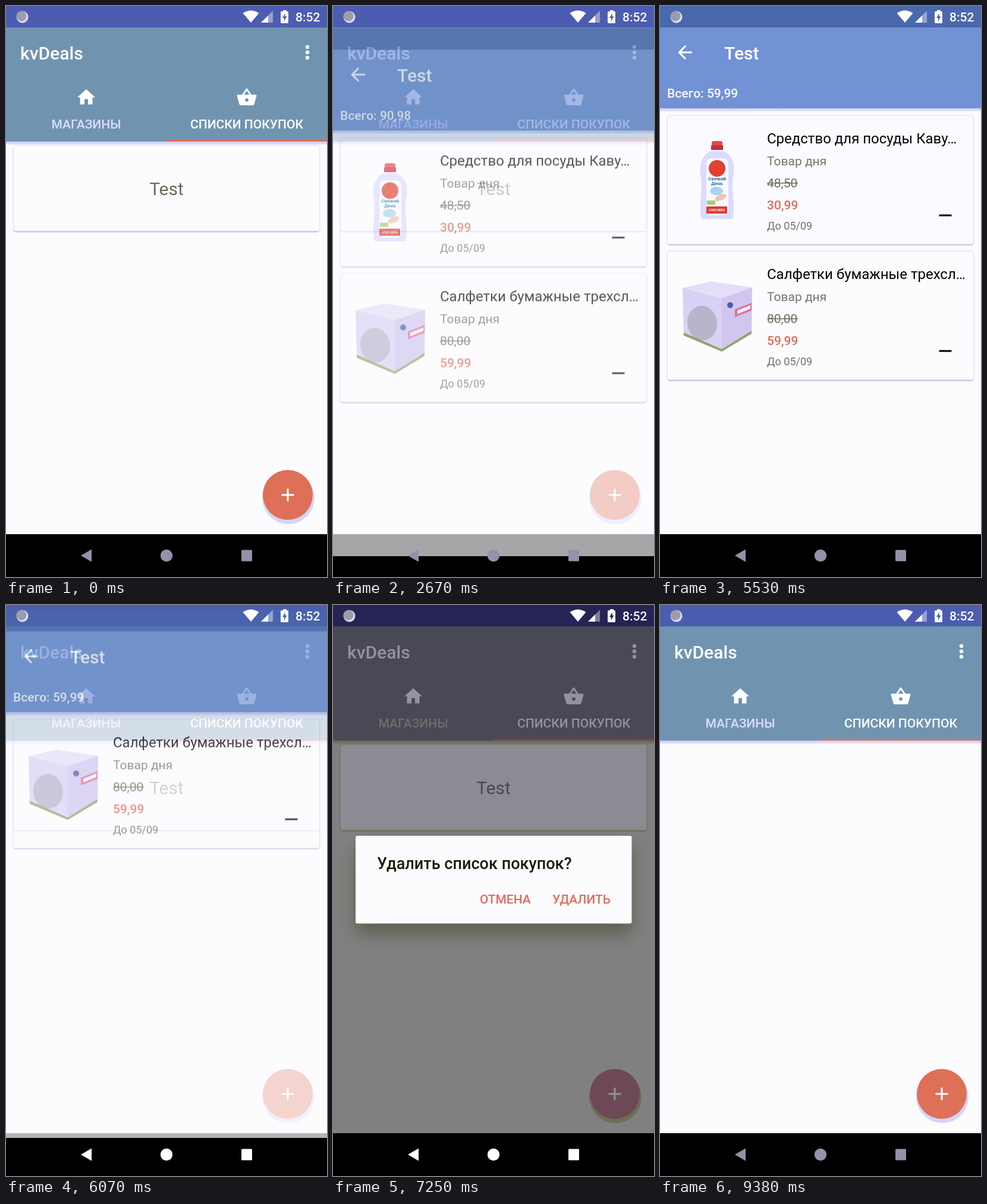
These frames come from a looping animation (540x960 px, 9.96 s). An HTML page with a canvas:

```html
<!DOCTYPE html>
<html lang="ru">
<head>
<meta charset="utf-8">
<title>Shopping lists</title>
<style>
html, body { margin: 0; width: 100%; height: 100%; overflow: hidden; background: #000; }
canvas { display: block; width: 100vw; height: 100vh; }
</style>
</head>
<body>
<canvas id="stage" width="540" height="960"></canvas>
<script>
const W = 540, H = 960, BOTTOM = 888, LOOP = 9960;
const stage = document.getElementById('stage').getContext('2d');
const layer = document.createElement('canvas');
layer.width = W;
layer.height = BOTTOM;
const layerCtx = layer.getContext('2d');
let c = stage;

const LIGHT = {
  bg: '#fcfcff', card: '#fcfcff', edge: '#dbdbff', cardBase: '#bcbccd', bar: '#7094b0', status: '#4c5cb0',
  title: '#ffffff', active: '#ffffff', idle: '#dbdbff', line: '#de6f56', text: '#6b6b57',
  fab: '#de7057', plus: '#ffffff', shade: '#d4d4fa', hole: '#6d92db'
};
const DETAIL = { ...LIGHT, bar: '#7292d6', status: '#4a68ac' };
const HALF = {
  bg: '#808080', card: '#8b8b93', edge: '#6d6d60', cardBase: '#6d6d55', bar: '#494955', status: '#242455',
  title: '#9292a0', active: '#9292a4', idle: '#6d6d6d', line: '#6d4955', text: '#494955',
  fab: '#6d4955', plus: '#9292a0', shade: '#6d6d55', hole: '#494955'
};
const DIM = {
  bg: '#6d6d55', card: '#6d6d55', edge: '#5f5f55', cardBase: '#494955', bar: '#2b4260', status: '#242455',
  title: '#747460', active: '#6d6d55', idle: '#4f4f5a', line: '#6d2455', text: '#242455',
  fab: '#672656', plus: '#92926d', shade: '#494955', hole: '#2b4260'
};

const HOME = new Path2D('M10 20v-6h4v6h5v-8h3L12 3 2 12h3v8z');
const BASKET = new Path2D('M17.21 9l-4.38-6.56c-.19-.28-.51-.42-.83-.42-.32 0-.64.14-.83.43L6.79 9H2c-.55 0-1 .45-1 1 0 .09.01.18.04.27l2.54 9.27c.23.84 1 1.46 1.92 1.46h13c.92 0 1.69-.62 1.93-1.46l2.54-9.27L23 10c0-.55-.45-1-1-1h-4.79zM9 9l3-4.4L15 9H9zm3 8c-1.1 0-2-.9-2-2s.9-2 2-2 2 .9 2 2-.9 2-2 2z');
const ARROW = new Path2D('M20 11H7.83l5.59-5.59L12 4l-8 8 8 8 1.41-1.41L7.83 13H20v-2z');

const clamp = x => Math.max(0, Math.min(1, x));
const span = (t, from, to) => clamp((t - from) / (to - from));
const smooth = k => 0.5 - Math.cos(Math.PI * k) / 2;

function mix(a, b, k) {
  const part = (s, i) => parseInt(s.substr(i, 2), 16);
  return '#' + [1, 3, 5].map(i =>
    Math.round(part(a, i) + (part(b, i) - part(a, i)) * k).toString(16).padStart(2, '0')).join('');
}

function blend(a, b, k) {
  const out = {};
  for (const key in a) out[key] = mix(a[key], b[key], k);
  return out;
}

function rect(x, y, w, h, color) {
  c.fillStyle = color;
  c.fillRect(x, y, w, h);
}

function disc(x, y, r, color) {
  c.fillStyle = color;
  c.beginPath();
  c.arc(x, y, r, 0, 7);
  c.fill();
}

function oval(x, y, rx, ry, tilt, color) {
  c.fillStyle = color;
  c.beginPath();
  c.ellipse(x, y, rx, ry, tilt, 0, 7);
  c.fill();
}

function poly(color, ...p) {
  c.fillStyle = color;
  c.beginPath();
  for (let i = 0; i < p.length; i += 2) c.lineTo(p[i], p[i + 1]);
  c.closePath();
  c.fill();
}

function round(x, y, w, h, r, color) {
  c.fillStyle = color;
  c.beginPath();
  c.roundRect(x, y, w, h, r);
  c.fill();
}

function text(s, x, y, size, color, weight = 400, align = 'left') {
  c.font = `${weight} ${size}px Roboto, sans-serif`;
  c.textAlign = align;
  c.fillStyle = color;
  c.fillText(s, x, y);
}

function icon(path, x, y, color) {
  c.save();
  c.translate(x, y);
  c.scale(1.5, 1.5);
  c.fillStyle = color;
  c.fill(path);
  c.restore();
}

function header(th, bottom) {
  rect(0, 0, W, BOTTOM, th.bg);
  rect(0, 0, W, 36, th.status);
  rect(0, 36, W, bottom - 36, th.bar);
  const g = c.createLinearGradient(0, bottom, 0, bottom + 6);
  g.addColorStop(0, th.shade);
  g.addColorStop(0.5, th.shade);
  g.addColorStop(1, th.bg);
  rect(0, bottom, W, 6, g);
}

function card(th, y, h) {
  round(12, y + 3, 516, h - 1, 5, th.edge);
  round(11.5, y - 0.5, 517, h + 1, 5, th.edge);
  round(12.5, y + 2, 515, h - 1.2, 4, th.cardBase);
  round(12.5, y + 0.5, 515, h - 1, 4, th.card);
}

function homeScreen(th, cardAlpha) {
  header(th, 228);
  text('kvDeals', 24, 90, 30, th.title, 500);
  for (const y of [69, 78, 87]) disc(507, y, 3.2, th.active);
  icon(HOME, 117, 135.5, th.active);
  disc(405, 158, 4, th.hole);
  icon(BASKET, 387, 135.5, th.active);
  text('МАГАЗИНЫ', 135, 206, 21, th.idle, 500, 'center');
  text('СПИСКИ ПОКУПОК', 405, 206, 21, th.active, 500, 'center');
  rect(270, 225, 270, 3, th.line);
  if (cardAlpha > 0) {
    c.globalAlpha = cardAlpha;
    card(th, 234, 145);
    text('Test', 270, 318, 30, th.text, 400, 'center');
    c.globalAlpha = 1;
  }
  disc(475, 827, 44, th.shade);
  disc(474, 822, 42, th.fab);
  rect(463.5, 820.5, 21, 3, th.plus);
  rect(472.5, 811.5, 3, 21, th.plus);
}

function bottle() {
  c.fillStyle = '#dbdbff';
  c.beginPath();
  c.moveTo(86, 60);
  c.bezierCurveTo(74, 64, 66, 78, 68, 98);
  c.bezierCurveTo(74, 124, 64, 146, 70, 174);
  c.lineTo(122, 174);
  c.bezierCurveTo(128, 146, 118, 124, 124, 98);
  c.bezierCurveTo(127, 78, 119, 64, 106, 60);
  c.fill();
  round(78, 72, 37, 96, 8, '#f8f8ff');
  round(87, 43, 18, 8, 3, '#e04a48');
  rect(86, 50, 20, 8, '#c82c3c');
  disc(96, 89, 14, '#e0402f');
  text('Свежий', 96, 109, 8, '#246daa', 700, 'center');
  text('День', 96, 117, 8, '#246daa', 700, 'center');
  oval(95, 127, 11, 7, 0, '#a8d3ee');
  oval(102, 138, 10, 5, -0.4, '#efc3ae');
  rect(79, 143, 14, 7, '#a6cb70');
  rect(78, 153, 35, 12, '#db3a35');
  text('АЛОЭ ВЕРА', 95.5, 161, 5, '#fff', 700, 'center');
}

function box() {
  poly('#e6def8', 38, 62, 85, 51, 155, 61, 104, 79);
  poly('#d8d2f4', 38, 62, 104, 79, 104, 169, 40, 141);
  poly('#d0c6ee', 104, 79, 155, 61, 154, 138, 104, 169);
  poly('#dc6f9f', 126, 98, 154, 87, 154, 100, 126, 111);
  poly('#f6effc', 130, 100, 152, 91, 152, 97, 130, 106);
  disc(118, 91, 5, '#4a5cb0');
  oval(71, 121, 25, 29, -0.15, '#b9b3cc');
  poly('#8fa66a', 40, 137, 104, 165, 154, 134, 154, 139, 104, 169, 40, 142);
}

const ITEMS = [
  { name: 'Средство для посуды Каву…', old: '48,50', price: '30,99', art: bottle },
  { name: 'Салфетки бумажные трехсл…', old: '80,00', price: '59,99', art: box }
];

function item(i, y, alpha) {
  const it = ITEMS[i];
  c.save();
  c.globalAlpha = alpha;
  c.translate(0, y);
  card(DETAIL, 0, 217);
  it.art();
  text(it.name, 180, 47, 24, '#000');
  text('Товар дня', 180, 84, 21, '#74746a');
  text(it.old, 180, 121, 21, '#6d6d5c');
  rect(180, 113, 52, 1.5, '#6d6d5c');
  text(it.price, 180, 158, 21, '#de6d5a', 500);
  text('До 05/09', 180, 192, 18, '#70706a');
  rect(469.5, 166.5, 21, 3, '#000');
  c.restore();
}

function detailScreen(t) {
  header(DETAIL, 172);
  icon(ARROW, 24, 60, '#fff');
  text('Test', 108, 90, 30, '#fff', 500);
  text('Всего: ' + (t < 5530 ? '90,98' : '59,99'), 12, 154, 21, '#fff', 500);
  const gone = span(t, 5530, 5650);
  if (gone < 1) item(0, 184, 1 - gone);
  item(1, 412 - 228 * smooth(span(t, 5650, 5900)), 1);
}

function dialog(alpha, half) {
  c.save();
  c.globalAlpha = alpha;
  c.shadowColor = half ? '#5e5e50' : '#454553';
  c.shadowBlur = half ? 30 : 16;
  c.shadowOffsetY = half ? 18 : 14;
  round(38, 388, 464.5, 147.5, 3, '#fcfcff');
  c.shadowColor = 'transparent';
  text('Удалить список покупок?', 74, 444, 27, '#1c1c08', 500);
  text('ОТМЕНА', 247, 502, 21, '#e06c5c', 500);
  text('УДАЛИТЬ', 369, 502, 21, '#e06c5c', 500);
  c.restore();
}

function statusIcons(th) {
  disc(27.5, 18.5, 10, '#dbdbf4');
  disc(26, 17, 8.5, '#9c9cab');
  c.fillStyle = '#fff';
  c.beginPath();
  c.moveTo(412, 28);
  c.lineTo(398.5, 12);
  c.quadraticCurveTo(412, 3, 425.5, 12);
  c.fill();
  poly('rgba(255,255,255,.42)', 429, 28, 449, 8, 449, 28);
  poly('#fff', 429, 28, 441, 16, 441, 28);
  rect(466, 7, 6, 4, '#fff');
  round(462, 9, 13, 20, 1.5, '#fff');
  poly(th.status, 470, 12, 465, 20, 468, 20, 467.5, 26, 472.5, 17.5, 469.5, 17.5);
  text('8:52', 487, 26, 21, '#fff', 500);
}

function navColor(t) {
  const grey = '#9292aa', mid = '#dbdbff', white = '#ffffff';
  if (t < 5880) return grey;
  if (t < 8680) return mix(white, mid, span(t, 7900, 8480));
  return mix(mid, grey, span(t, 8680, 9380));
}

function navIcons(color) {
  poly(color, 126, 924, 144, 913.5, 144, 934.5);
  disc(270, 924, 10.2, color);
  round(396, 914.5, 18, 19, 1.5, color);
}

function theme(t) {
  if (t < 7250) return LIGHT;
  if (t < 7370) return HALF;
  return blend(DIM, LIGHT, span(t, 8720, 8940));
}

// Position and opacity of the sliding detail window.
function detailPose(t) {
  if (t < 2640 || t >= 6178) return null;
  if (t < 5928) {
    const since = t - 2624;
    return {
      y: 76.8 * (1 - clamp(since / 350)) ** 5,
      alpha: 1 - (1 - clamp(since / 200)) ** 4
    };
  }
  return { y: 76.8 * ((t - 5928) / 250) ** 4, alpha: 1 - span(t, 6028, 6178) };
}

function draw(t) {
  const th = theme(t), pose = detailPose(t);
  c = stage;
  rect(0, 0, W, H, '#000');
  homeScreen(th, 1 - span(t, 8720, 8840));
  if (pose) {
    c = layerCtx;
    detailScreen(t);
    c = stage;
    c.globalAlpha = pose.alpha;
    c.drawImage(layer, 0, pose.y);
    c.globalAlpha = 1;
  }
  const shown = t < 7250 ? 0 : 1 - span(t, 8720, 8880);
  if (shown > 0) dialog(shown, t < 7370);
  statusIcons(th);
  navIcons(navColor(t));
}

const start = performance.now();
function tick() {
  draw((performance.now() - start) % LOOP);
  requestAnimationFrame(tick);
}
tick();
</script>
</body>
</html>
```
